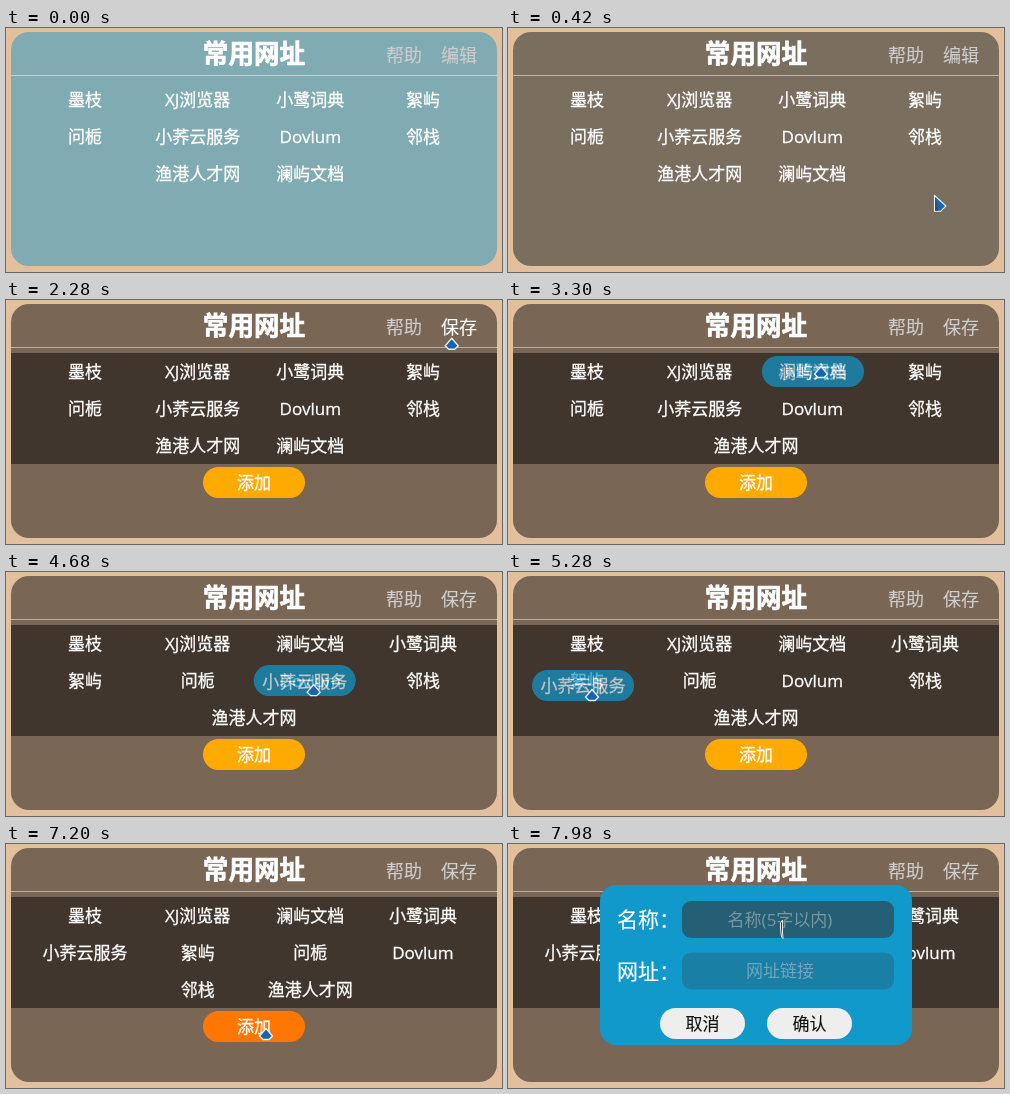
An HTML page that plays this animation: 496 by 244 pixels, repeating every 8 s.

```html
<!DOCTYPE html>
<html lang="zh-CN">
<head>
<meta charset="utf-8">
<style>
html, body { margin: 0; width: 100%; height: 100%; overflow: hidden; background: #e2bf9d; }
svg { display: block; font-family: "Open Sans", "Noto Sans CJK SC", "Noto Sans CJK", sans-serif; }
</style>
</head>
<body>
<svg id="stage" width="496" height="244"></svg>
<script>
const LOOP = 8000, TICK = 60;
const EDIT = 1740, LIFT1 = 3060, DROP1 = 3840, LIFT2 = 4680, DROP2 = 5820, DIALOG = 7380;
const sites = ['墨枝', 'XJ浏览器', '小鹭词典', '絮屿', '问栀', '小荞云服务', 'Dovlum', '邻栈', '渔港人才网', '澜屿文档'];

// eased pointer moves: from time, to time, x, y, sideways bend
const moves = [
  [240, 420, 426, 167],
  [720, 1200, 448, 36],
  [2240, 2760, 313, 140],
  [3000, 3300, 313, 66, 9],
  [4140, 4320, 313, 112],
  [4620, 5280, 84, 117],
  [5280, 5520, 75, 112],
  [6180, 6660, 400, 76],
  [6660, 6960, 287, 178],
  [6960, 7200, 260, 184],
  [DIALOG, 7920, 273, 85]
];

const clamp = v => Math.min(1, Math.max(0, v));

function pointer(t) {
  if (t < 300) return [-99, -99];
  let x = 500, y = 172;
  for (const [start, end, toX, toY, bend = 0] of moves) {
    const u = clamp((t - start) / (end - start)), f = u * u * (3 - 2 * u);
    x += (toX - x) * f + bend * Math.sin(Math.PI * f);
    y += (toY - y) * f;
  }
  return [x, y];
}

const inside = ([px, py], [x, y, w, h]) => px >= x && px <= x + w && py >= y && py <= y + h;
// hover strength: share of the last three ticks spent in the box
const hover = (t, box) => [0, 1, 2].filter(k => inside(pointer(t - k * TICK), box)).length / 3;
const mix = (a, b, f) => `rgb(${a.map((v, i) => Math.round(v + (b[i] - v) * f))})`;

const rect = ([x, y, w, h], r, fill, more = '') =>
  `<rect x="${x}" y="${y}" width="${w}" height="${h}" rx="${r}" fill="${fill}" ${more}/>`;
// a thin stroke of the same colour gives the letters a little more weight
const text = (s, x, y, { fill = '#fff', size = 17, bold = .3, anchor = 'middle', weight = 400 } = {}) =>
  `<text x="${x}" y="${y + size * .38}" fill="${fill}" stroke="${fill}" stroke-width="${bold}"
    font-size="${size}" font-weight="${weight}" text-anchor="${anchor}">${s}</text>`;

function arrange(t) {
  const list = [...sites];
  let held = null;
  const drag = (from, to, lift, drop) => {
    if (t < lift) return;
    const [name] = list.splice(from, 1);
    if (t < drop) held = name;
    else list.splice(to, 0, name);
  };
  drag(9, 2, LIFT1, DROP1);
  drag(6, 4, LIFT2, DROP2);
  return { list, held };
}

// rows of four, the last row centred
function slot(i, n) {
  const row = Math.floor(i / 4), count = Math.min(4, n - row * 4);
  return [248 + 112.6 * (i % 4 - (count - 1) / 2), 71.5 + 37 * row];
}

const pill = (x, y) => [x - 51, y - 15.5, 102, 31];
const addBox = pill(248, 182.5), helpBox = [380, 15, 36, 26], editBox = [435, 15, 36, 26];
const nameBox = [174, 57, 212, 37], urlBox = [174, 108.5, 212, 37];
const cancelBox = [152, 164, 85, 31], okBox = [259, 164, 85, 31];

function field(t, label, box, hint) {
  const y = box[1] + 18.5;
  return text(label, 109, y, { size: 21, bold: .2, anchor: 'start' }) +
    rect(box, 9, '#333', `fill-opacity="${.25 + .32 * hover(t, box)}"`) +
    text(hint, 272, y, { fill: 'rgba(205,205,205,.5)', bold: 0 });
}

const button = (box, label) =>
  rect(box, 15.5, '#eee') + text(label, box[0] + box[2] / 2, 179.5, { fill: '#111', bold: .1 });

const dialog = t => rect([92, 41, 312, 160], 16, '#19c') +
  field(t, '名称：', nameBox, '名称(5字以内)') + field(t, '网址：', urlBox, '网址链接') +
  button(cancelBox, '取消') + button(okBox, '确认');

const shapes = {
  arrow: `<path d="M.5 .5L12 11L6.5 16.3H.5Z" fill="#1767ae" stroke="#eee" stroke-width="1.1"/>
    <path d="M1.1 2L4 15.7H1.1Z" fill="#3b4a58"/>`,
  hand: '<path d="M0 .5L6.5 8L3 11.5H-3L-6.5 8Z" fill="#1665b0" stroke="#eee" stroke-width="1.3"/>',
  beam: '<path d="M1.5 -9L-.5 -6V0L.5 8L2 9.5L1.5 3V-5Z" fill="#234" stroke="#eee"/>'
};

function scene(t) {
  const at = pointer(t), editing = t >= EDIT, open = t >= DIALOG;
  const { list, held } = arrange(t);
  const fade = 1 - Math.pow(1 - clamp((t - 240) / 240), 1.6);
  const link = (s, box) => text(s, box[0] + 18, 27.5,
    { fill: mix([204, 204, 204], [255, 255, 255], hover(t, box)), size: 18, bold: .15 });
  let targets = [helpBox, editBox];

  let out = rect([5, 4, 486, 234], 18, mix([128, 171, 178], [121, 102, 85], fade)) +
    rect([5, 47, 486, 1], 0, '#fff', 'fill-opacity=".48"') +
    text('常用网址', 248, 25.5, { size: 25.6, bold: .7, weight: 700 }) +
    link('帮助', helpBox) + link(editing ? '保存' : '编辑', editBox);

  if (editing) {
    out += rect([5, 53, 486, 111], 0, '#40362e') +
      rect(addBox, 15.5, mix([255, 170, 0], [255, 119, 0], hover(t, addBox))) + text('添加', 248, 183);
    targets.push(addBox);
  }

  list.forEach((name, i) => {
    const [x, y] = slot(i, list.length), box = pill(x, y);
    const glow = held || open ? 0 : hover(t, box);
    out += rect(box, 15.5, '#19c', `fill-opacity="${glow}"`) + text(name, x, y + .5);
    targets.push(box);
  });

  if (held) {
    const [dx, dy] = t < DROP1 ? [-8, 5.5] : [-9, -3.5];
    const x = at[0] + dx, y = at[1] + dy;
    out += `<g opacity=".7">${rect(pill(x, y), 15.5, '#19c')}${text(held, x, y + .5)}</g>`;
  }

  if (open) {
    out += dialog(t);
    targets = [cancelBox, okBox];
  }

  const over = boxes => boxes.some(b => inside(at, b));
  const kind = open && over([nameBox, urlBox]) ? 'beam' : held || over(targets) ? 'hand' : 'arrow';
  return out + `<g transform="translate(${at})">${shapes[kind]}</g>`;
}

const stage = document.getElementById('stage');
let last = -1;
function frame(now) {
  const t = Math.floor(now % LOOP / TICK) * TICK;
  if (t !== last) stage.innerHTML = scene(last = t);
  requestAnimationFrame(frame);
}
frame(performance.now());
</script>
</body>
</html>
```
